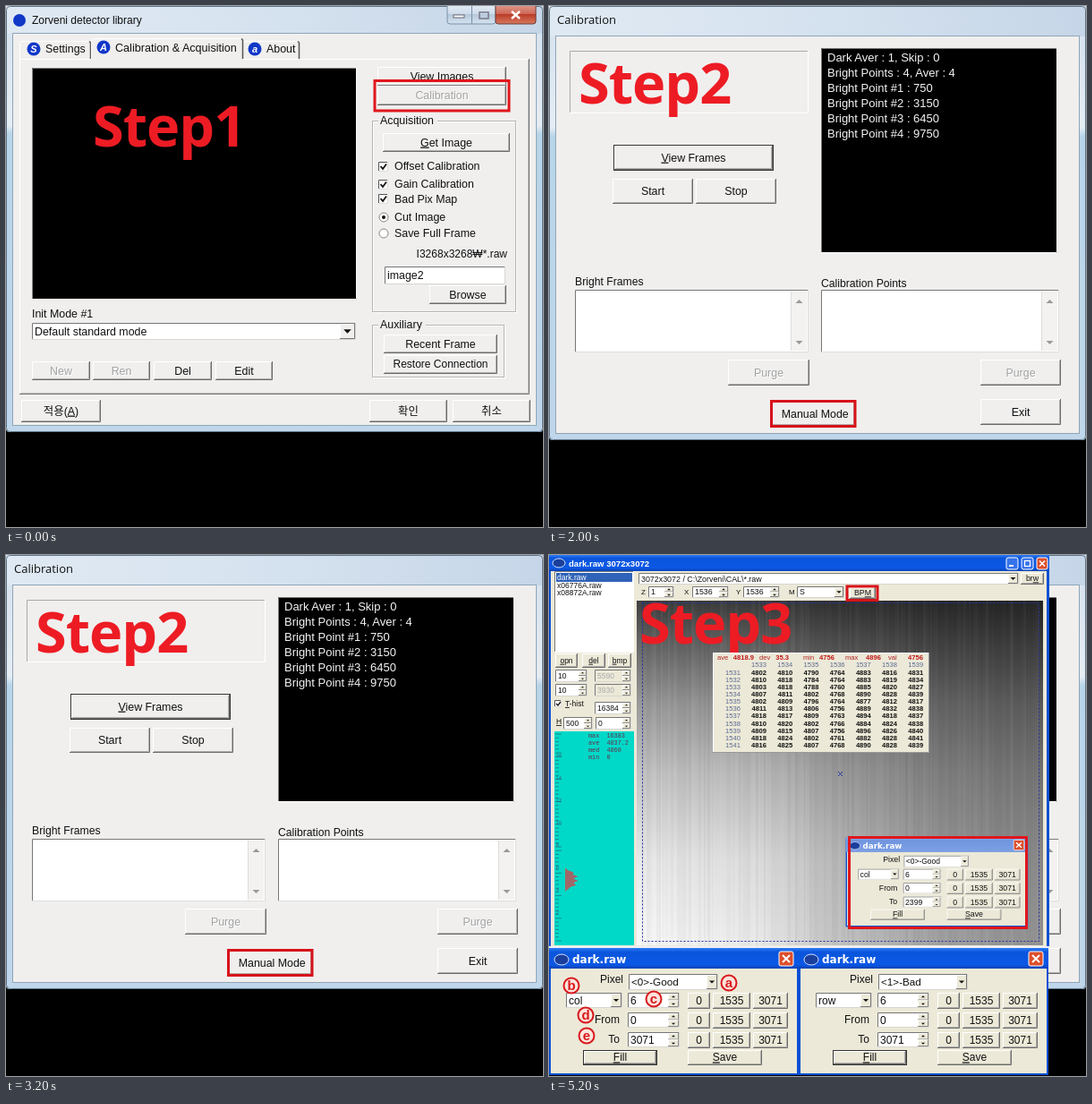
Write an HTML page that moves like this. It is 600 by 582 pixels and loops after 6000 ms.

```html
<!DOCTYPE html>
<html lang="en">
<head>
<meta charset="utf-8">
<title>Calibration steps</title>
<style>
html, body { margin: 0; width: 100%; height: 100%; overflow: hidden; background: #000; }
svg { display: block; width: 600px; height: 582px; font-family: "Liberation Sans", Arial, "Noto Sans CJK KR", "Noto Sans CJK", sans-serif; }
text { white-space: pre; }
.step { visibility: hidden; animation: show 6s step-end infinite; }
.s2 { animation-delay: -4s; }
.s3 { animation-delay: -2s; }
.head { font: bold 63px "Open Sans", "Noto Sans", sans-serif; letter-spacing: -1px; }
@keyframes show {
  0% { visibility: visible; }
  33.3333% { visibility: hidden; }
  100% { visibility: hidden; }
}
</style>
</head>
<body>
<svg id="stage" viewBox="0 0 600 582" xmlns="http://www.w3.org/2000/svg"></svg>
<script>
const FACE = '#f0efee', BEIGE = '#ece9d8', RED = '#ed1c24', BLUE = '#1238c8', EDGE = '#0b50d4';

const esc = s => s.replace(/&/g, '&amp;').replace(/</g, '&lt;').replace(/>/g, '&gt;')
  .replace(/_(.)/g, '<tspan text-decoration="underline">$1</tspan>');

// Boxes are given by their two corners.
const rect = (x, y, x2, y2, fill, more = '') =>
  `<rect x="${x}" y="${y}" width="${x2 - x}" height="${y2 - y}" fill="${fill}" ${more}/>`;
const frame = (x, y, x2, y2, color, w = 1) =>
  rect(x, y, x2, y2, 'none', `stroke="${color}" stroke-width="${w}"`);
const path = (d, more) => `<path d="${d}" ${more}/>`;
const line = (d, color, w = 1) => path(d, `fill="none" stroke="${color}" stroke-width="${w}"`);
const dot = (x, y, r, fill, more = '') => `<circle cx="${x}" cy="${y}" r="${r}" fill="${fill}" ${more}/>`;

const text = (x, y, s, { size = 12.4, fill = '#111', anchor = 'start', more = '' } = {}) =>
  `<text x="${x}" y="${y}" font-size="${size}" fill="${fill}" text-anchor="${anchor}" ${more}>${esc(s)}</text>`;
const heading = (x, y, s) => `<text class="head" x="${x}" y="${y}" fill="${RED}">${s}</text>`;

function bevel(x, y, x2, y2, light, dark, fill = 'none') {
  return rect(x, y, x2, y2, fill) +
    line(`M${x + .5} ${y2}V${y + .5}H${x2}`, light) +
    line(`M${x} ${y2 - .5}H${x2 - .5}V${y}`, dark);
}

function button(x, y, x2, y2, label, { size = 12.4, off, face = FACE, strong } = {}) {
  if (strong) {
    return rect(x, y, x2, y2, '#333') + button(x + 1, y + 1, x2 - 1, y2 - 1, label, { size, face });
  }
  const cx = (x + x2) / 2, ty = (y + y2) / 2 + size * .33;
  return bevel(x, y, x2, y2, '#fff', '#6b6b6b', face) +
    line(`M${x + 1} ${y2 - 1.5}H${x2 - 1.5}V${y + 1}`, '#b0aeaa') +
    (off ? text(cx + 1, ty + 1, label, { size, fill: '#fff', anchor: 'middle' }) : '') +
    text(cx, ty, label, { size, fill: off ? '#a3a3a3' : '#111', anchor: 'middle' });
}

const arrow = (x, y, r, fill = '#111') => path(`M${x - r} ${y - r / 2}h${2 * r}l${-r} ${r}z`, `fill="${fill}"`);
const upArrow = (x, y, r, fill = '#111') => path(`M${x - r} ${y + r / 2}h${2 * r}l${-r} ${-r}z`, `fill="${fill}"`);

function field(x, y, x2, y2, label, { size = 12.4, kind, off, face = BEIGE, w = 13 } = {}) {
  let s = bevel(x, y, x2, y2, '#777', '#d8d6d0', off ? BEIGE : '#fff') +
    text(x + 3, (y + y2) / 2 + size * .34, label, { size, fill: off ? '#aaa' : '#111' });
  const l = x2 - w, r = x2 - 1, m = (y + y2) / 2, c = (l + r) / 2;
  if (kind === 'drop') s += bevel(l, y + 1, r, y2 - 1, '#fff', '#777', face) + arrow(c, m, w * .24);
  if (kind === 'spin') s += bevel(l, y + 1, r, m, '#fff', '#888', face) + bevel(l, m, r, y2 - 1, '#fff', '#888', face) +
    upArrow(c, (y + m) / 2, w * .16) + arrow(c, (m + y2) / 2, w * .16);
  return s;
}

const group = (x, y, x2, y2, label, w) =>
  frame(x + 1.5, y + 1.5, x2 + 1.5, y2 + 1.5, '#fff') + frame(x + .5, y + .5, x2 + .5, y2 + .5, '#b5b5b5') +
  rect(x + 7, y - 4, x + 10 + w, y + 4, FACE) + text(x + 9, y + 4, label);

const check = (x, y, label, ty) => bevel(x, y, x + 11, y + 11, '#555', '#ddd', '#fff') +
  line(`M${x + 2.5} ${y + 5}l2.5 3 4 -5.5`, '#111', 1.8) + text(x + 18, ty, label);

const radio = (x, y, label, on) => dot(x, y, 5, '#fff', 'stroke="#888"') +
  (on ? dot(x, y, 2, '#111') : '') + text(x + 12, y + 4, label);

function aero(h, top, title, x, more) {
  return rect(0, 0, 600, h, 'url(#aero)', 'rx="4"') + rect(0, 0, 600, top, 'url(#cap)') +
    rect(.5, .5, 599.5, h - .5, 'none', 'stroke="#5d7488" rx="4"') +
    rect(7, top, 593, h - 7, FACE) + frame(7.5, top - .5, 592.5, h - 7.5, '#8fa5b8') +
    text(x, 20, title, more);
}

function stepOne() {
  const badge = (x, y, c) => dot(x, y, 7.5, BLUE) +
    text(x, y + 4, c, { size: 11, fill: '#fff', anchor: 'middle', more: 'font-weight="bold" font-style="italic"' });
  const tab = (x, y, x2, fill = 'none') => rect(x, y, x2, 60, fill) +
    line(`M${x + .5} 59V${y + 2}L${x + 2} ${y + .5}H${x2 - 2}`, '#fff') +
    line(`M${x2 - 2} ${y + .5}L${x2 - .5} ${y + 2}V59`, '#555', 1.5);
  return aero(476, 31, 'Zorveni detector library', 29, { size: 12 }) + dot(15, 16, 7, BLUE) +
    rect(493, -3, 547, 20, 'url(#glass)', 'stroke="#7890a8" rx="3"') + line('M520.5 0V20', '#7890a8') +
    rect(547, -3, 592, 20, 'url(#close)', 'stroke="#6b3a35" rx="3"') +
    rect(500, 10, 512, 13, '#fff', 'stroke="#667"') + frame(529, 7, 539, 14, '#778', 1.5) +
    line('M565 6l9 8m0 -8l-9 8', '#fff', 2.5) +
    bevel(15, 59, 585, 434, '#fff', '#777') + line('M16 432.5H583.5V60', '#bbb') +
    tab(15, 39, 95) + tab(264, 39, 328) + tab(95, 36, 265, FACE) +
    badge(31, 48, 'S') + text(44, 52, 'Settings') +
    badge(109, 46, 'A') + text(122, 51, 'Calibration & Acquisition', { size: 12.6 }) +
    badge(278, 48, 'a') + text(291, 52, 'About') +
    bevel(29, 69, 392, 328, '#888', '#fff', '#000') + heading(97, 157, 'Step1') +
    button(415, 68, 559, 89, 'View Images') + button(415, 89, 559, 111, 'Calibration', { off: 1 }) +
    rect(416, 83, 558, 88, FACE) + line('M415 88.5H558', '#777') +
    frame(412, 83.5, 562, 117, '#e0161c', 3) +
    group(409, 128, 569, 341, 'Acquisition', 63) + button(421, 142, 563, 163, '_Get Image') +
    check(416, 174, 'Offset Calibration', 183) + check(416, 194, 'Gain Calibration', 203) +
    check(416, 210, 'Bad Pix Map', 220) +
    radio(422, 236, 'Cut Image', 1) + radio(422, 254, 'Save Full Frame') +
    text(560, 281, 'I3268x3268₩*.raw', { size: 12, anchor: 'end' }) +
    field(423, 291, 558, 311, 'image2') + button(473, 312, 559, 333, 'Browse') +
    group(409, 356, 556, 414, 'Auxiliary', 50) +
    button(422, 367, 549, 388, 'Recent Frame') + button(422, 390, 549, 411, 'Restore Connection', { size: 12 }) +
    text(29, 348, 'Init Mode #1') +
    field(29, 354, 391, 373, 'Default standard mode', { kind: 'drop', w: 18, face: FACE }) +
    button(29, 397, 94, 418, 'New', { off: 1 }) + button(97, 397, 161, 418, 'Ren', { off: 1 }) +
    button(165, 397, 230, 418, 'Del') + button(234, 397, 298, 418, 'Edit') +
    button(17, 440, 106, 465, '적용(_A)') + button(406, 440, 493, 465, '확인') + button(499, 440, 586, 465, '취소');
}

function listBox(x, x2) {
  const c = x2 - 10.5;
  return bevel(x, 317, x2, 387, '#777', '#ddd', '#fff') + rect(x2 - 19, 319, x2 - 2, 385, '#f3f2f1') +
    line(`M${x2 - 19.5} 319V385`, '#ddd') + upArrow(c, 330, 4, '#999') + arrow(c, 376, 4, '#999');
}

function stepTwo() {
  const log = ['Dark Aver : 1, Skip : 0', 'Bright Points : 4, Aver : 4', 'Bright Point #1 : 750',
    'Bright Point #2 : 3150', 'Bright Point #3 : 6450', 'Bright Point #4 : 9750'];
  return aero(485, 34, 'Calibration', 9, { size: 13, more: 'font-family="Open Sans, sans-serif"' }) +
    bevel(23, 50, 290, 120, '#aaa', '#fff') + heading(33, 109, 'Step2') +
    button(72, 155, 251, 184, '_View Frames', { strong: 1 }) +
    button(71, 193, 161, 221, 'Start') + button(164, 193, 254, 221, 'Stop') +
    bevel(304, 47, 568, 276, '#777', '#fff', '#000') +
    log.map((s, i) => text(311, 61.5 + i * 17.1, s, { size: 13, fill: '#f4f4f4' })).join('') +
    text(29, 312, 'Bright Frames', { size: 12.2 }) + text(304, 314, 'Calibration Points', { size: 12.2 }) +
    listBox(29, 290) + listBox(304, 570) +
    button(200, 395, 291, 424, 'Purge', { off: 1 }) + button(482, 395, 572, 424, 'Purge', { off: 1 }) +
    button(249, 442, 342, 469, ' Manual Mode') + frame(248.5, 441.5, 342, 469.5, '#d8121a', 3) +
    button(482, 439, 572, 468, 'Exit');
}

// Pixel editor: its face spans 275 by 138 from the origin, with a thin edge around it.
function editor(place, pixel, axis, to, { strong, bar = 'xp' } = {}) {
  const size = 12, opt = { size, face: BEIGE };
  let s = rect(-2, -2, 277, 140, EDGE) + rect(-2, -2, 277, 21, `url(#${bar})`) + rect(0, 21, 275, 138, BEIGE) +
    `<ellipse cx="12" cy="11" rx="8" ry="6" fill="#1b3f9c" stroke="#cfe0ff"/>` +
    text(24, 15, 'dark.raw', { size: 12, fill: '#fff', more: 'font-family="DejaVu Sans, sans-serif" font-weight="bold"' }) +
    rect(255, 2, 271, 18, '#dd4f2c', 'stroke="#fff" rx="2"') + line('M259 6l8 8m0 -8l-8 8', '#fff', 2) +
    text(81, 37, 'Pixel', { size, anchor: 'end' }) + text(77, 82, 'From', { size, anchor: 'end' }) +
    text(77, 104, 'To', { size, anchor: 'end' }) +
    field(87, 27, 187, 45, pixel, { size: 11.7, kind: 'drop' }) + field(17, 48, 80, 65, axis, { size, kind: 'drop' });
  ['6', '0', to].forEach((v, i) => {
    const y = 48 + 22 * i;
    s += field(86, y, 144, y + 17, v, { size, kind: 'spin' }) + button(153, y, 178, y + 18, '0', opt) +
      button(181, y, 223, y + 18, '1535', opt) + button(226, y, 265, y + 18, '3071', opt);
  });
  s += button(36, 112, 119, 129, '_Fill', { ...opt, strong }) + button(153, 112, 236, 129, '_Save', opt);
  return `<g transform="${place}">${s}</g>`;
}

function scan() {
  let seed = 7, s = rect(98, 51, 552, 436, 'url(#down)') + rect(98, 51, 552, 436, 'url(#across)');
  const rnd = () => (seed = seed * 16807 % 2147483647) / 2147483647;
  for (let x = 98; x < 550;) {
    const w = 1 + Math.floor(rnd() * 3);
    s += rect(x, 51, x + w, 436, rnd() < .6 ? '#000' : '#fff', `opacity="${(rnd() * .04).toFixed(3)}"`);
    x += w;
  }
  return s + rect(104.5, 53.5, 547.5, 431.5, 'none', 'stroke="#2430a0" stroke-dasharray="2 2"') +
    line('M323 242l5 5m0 -5l-5 5', '#2430a0');
}

function pixelTable() {
  const rows = `4802 4810 4790 4764 4883 4816 4831
4810 4818 4784 4764 4883 4819 4834
4803 4818 4788 4760 4885 4820 4827
4807 4811 4802 4768 4890 4828 4839
4802 4809 4796 4764 4877 4812 4817
4811 4813 4806 4756 4889 4832 4838
4818 4817 4809 4763 4894 4818 4837
4810 4820 4802 4766 4884 4824 4838
4809 4815 4807 4756 4896 4826 4840
4818 4824 4802 4761 4882 4828 4841
4816 4825 4807 4768 4890 4828 4839`.split('\n');
  const bold = 'font-weight="bold"';
  const cell = (x, y, v, fill, more) => text(x, y, v, { size: 7.6, fill, anchor: 'end', more });
  let s = bevel(183, 109, 425, 221, '#fff', '#999', BEIGE);
  [['ave', 188, '4818.9', 229], ['dev', 235, '35.3', 268], ['min', 284, '4756', 319],
    ['max', 331, '4896', 371], ['val', 379, '4756', 418]].forEach(([k, x, v, x2]) => {
    s += text(x, 117, k, { size: 7.6, fill: '#b02020' }) + cell(x2, 117, v, '#c01818', bold);
  });
  rows.forEach((row, i) => {
    const y = 133.5 + i * 8.15;
    s += cell(214, y, `${1531 + i}`, '#5a6890');
    row.split(' ').forEach((v, j) => {
      const x = 243 + j * 29.2;
      if (!i) s += cell(x, 125, `${1533 + j}`, '#5a6890');
      s += cell(x, y, v, '#111', bold);
    });
  });
  return s;
}

function sidePanel() {
  const size = 8.5, b = { size, face: BEIGE }, spin = { size, kind: 'spin', w: 10 };
  let s = bevel(6, 18, 95, 109, '#777', '#fff', '#fff') + rect(8, 20, 93, 30, '#2f62b8') +
    text(9, 28, 'dark.raw', { size, fill: '#fff' }) + text(9, 37, 'x06776A.raw', { size }) +
    text(9, 45, 'x08872A.raw', { size }) +
    button(7, 110, 32, 126, '_opn', b) + button(37, 110, 63, 126, '_del', b) + button(66, 110, 92, 126, '_bmp', b) +
    field(7, 128, 43, 142, '10', spin) + field(51, 128, 92, 142, '5590', { ...spin, off: 1 }) +
    field(7, 144, 43, 158, '10', spin) + field(51, 144, 92, 158, '3930', { ...spin, off: 1 }) +
    bevel(6, 162, 14, 170, '#555', '#ddd', '#fff') + line('M8 166l2 2 3 -4', '#111', 1.3) +
    text(18, 169, '_T-hist', { size }) + field(51, 164, 92, 178, '16384', spin) +
    text(8, 189, '_H', { size }) + field(16, 181, 49, 195, '500', spin) + field(52, 181, 92, 195, '0', spin) +
    rect(6, 197, 95, 436, '#00d9c8');
  const mono = 'font-family="Liberation Mono, monospace"';
  ['max  16383', 'ave  4837.2', 'med  4860', 'min  0'].forEach((v, i) => {
    s += text(44, 204 + 8 * i, v, { size: 6.8, fill: '#6a2a48', more: mono });
  });
  for (let y = 200; y < 434; y += 4.2) s += line(`M7 ${y}h${y % 5 < 1 ? 7 : 4}`, '#178a88');
  for (let i = 0; i < 8; i++) s += text(8, 226 + i * 25, `${16 - 2 * i}`, { size: 5.5, fill: '#31607a' });
  for (let i = 0; i < 26; i++) {
    const w = 14 * Math.exp(-(((i - 12) / 10) ** 4)) * (.85 + .15 * Math.sin(i * 5));
    s += line(`M18 ${350.5 + i}h${w.toFixed(1)}`, '#a06868');
  }
  return s;
}

function stepThree() {
  const size = 8.8, spin = { size, kind: 'spin', w: 11 };
  const label = (x, s) => text(x, 44, s, { size: 8 });
  const mark = (x, y, c) => dot(x, y, 8.5, '#fbe4dc', 'stroke="#d8181c" stroke-width="2"') +
    text(x, y + 4.5, c, { size: 15, fill: '#d8181c', anchor: 'middle', more: 'font-weight="bold"' });
  return stepTwo() +
    rect(0, 0, 559, 438, EDGE) + rect(0, 0, 559, 18, 'url(#xp)') + rect(2, 18, 556, 437, BEIGE) +
    `<ellipse cx="11" cy="9" rx="7" ry="5" fill="#1b3f9c" stroke="#cfe0ff"/>` +
    text(22, 13, 'dark.raw 3072x3072', { size: 9.6, fill: '#fff', more: 'font-weight="bold"' }) +
    rect(511, 3, 524, 16, '#3672ea', 'stroke="#fff" rx="2"') + rect(514, 11, 519, 13, '#fff') +
    rect(528, 3, 541, 16, '#3672ea', 'stroke="#fff" rx="2"') + frame(531.5, 6.5, 537.5, 12.5, '#fff', 1.3) +
    rect(545, 3, 557, 16, '#dd4f2c', 'stroke="#fff" rx="2"') + line('M548 6.5l6 6m0 -6l-6 6', '#fff', 1.6) +
    sidePanel() +
    field(100, 20, 525, 33, '3072x3072 / C:\\Zorveni\\CAL\\*.raw', { size: 8.9, kind: 'drop', w: 12 }) +
    button(527, 20, 553, 33, 'br_w', { size, face: BEIGE }) +
    label(103, 'Z') + field(111, 35, 140, 48, '1', spin) + label(151, 'X') + field(160, 35, 201, 48, '1536', spin) +
    label(209, 'Y') + field(217, 35, 258, 48, '1536', spin) + label(268, 'M') +
    field(277, 35, 330, 48, 'S', { size, kind: 'drop', w: 11 }) +
    button(336, 36, 365, 49, 'BP_M', { size, face: BEIGE }) +
    scan() + frame(333, 35, 367, 50.5, '#d8121a', 3) + heading(101, 99, 'Step3') + pixelTable() +
    editor('translate(333 317) scale(.73 .703)', '<0>-Good', 'col', '2399', { bar: 'pale' }) +
    frame(335.5, 315.5, 533.5, 416.5, '#e0161c', 3) +
    rect(0, 437, 559, 439, '#eef1f4') +
    editor('translate(2 441)', '<0>-Good', 'col', '3071', { strong: 1 }) +
    editor('translate(281 441)', '<1>-Bad', 'row', '3071', { strong: 1 }) +
    mark(201, 478, 'a') + mark(25, 481, 'b') + mark(117, 496, 'c') + mark(41, 514, 'd') + mark(42, 537, 'e');
}

function gradient(id, dir, ...stops) {
  const to = dir === 'v' ? 'x2="0" y2="1"' : 'x2="1" y2="0"';
  return `<linearGradient id="${id}" ${to}>` +
    stops.map(([at, c, a = 1]) => `<stop offset="${at}" stop-color="${c}" stop-opacity="${a}"/>`).join('') +
    '</linearGradient>';
}

document.getElementById('stage').innerHTML = '<defs>' +
  gradient('aero', 'v', [0, '#d3e0ed'], [.28, '#e6edf4'], [.3, '#b8d5e9'], [1, '#c0d6ea']) +
  gradient('cap', 'h', [0, '#dfe9f3'], [.4, '#d8e4f0'], [1, '#c6d6e8']) +
  gradient('glass', 'v', [0, '#e6eef7'], [.5, '#cfdcea'], [.52, '#b4c7da'], [1, '#d5e3f0']) +
  gradient('close', 'v', [0, '#e0a197'], [.5, '#cf6a58'], [.52, '#b83a26'], [1, '#d9785f']) +
  gradient('xp', 'v', [0, '#2f7cf4'], [.2, '#0a55dc'], [.8, '#0b58e6'], [1, '#0842b4']) +
  gradient('pale', 'v', [0, '#8fb0ee'], [.2, '#7096e0'], [1, '#7d9fe4']) +
  gradient('down', 'v', [0, '#3c3c3c'], [.12, '#626262'], [.3, '#989898'], [.5, '#c2c2c2'], [.75, '#e8e8e8'], [1, '#f8f8f8']) +
  gradient('across', 'h', [0, '#000', 0], [.3, '#000', .06], [.5, '#000', .22], [.75, '#000', .36], [1, '#000', .42]) +
  '</defs>' + rect(0, 0, 600, 582, '#000') +
  [stepOne, stepTwo, stepThree].map((draw, i) => `<g class="step s${i + 1}">${draw()}</g>`).join('');
</script>
</body>
</html>
```
